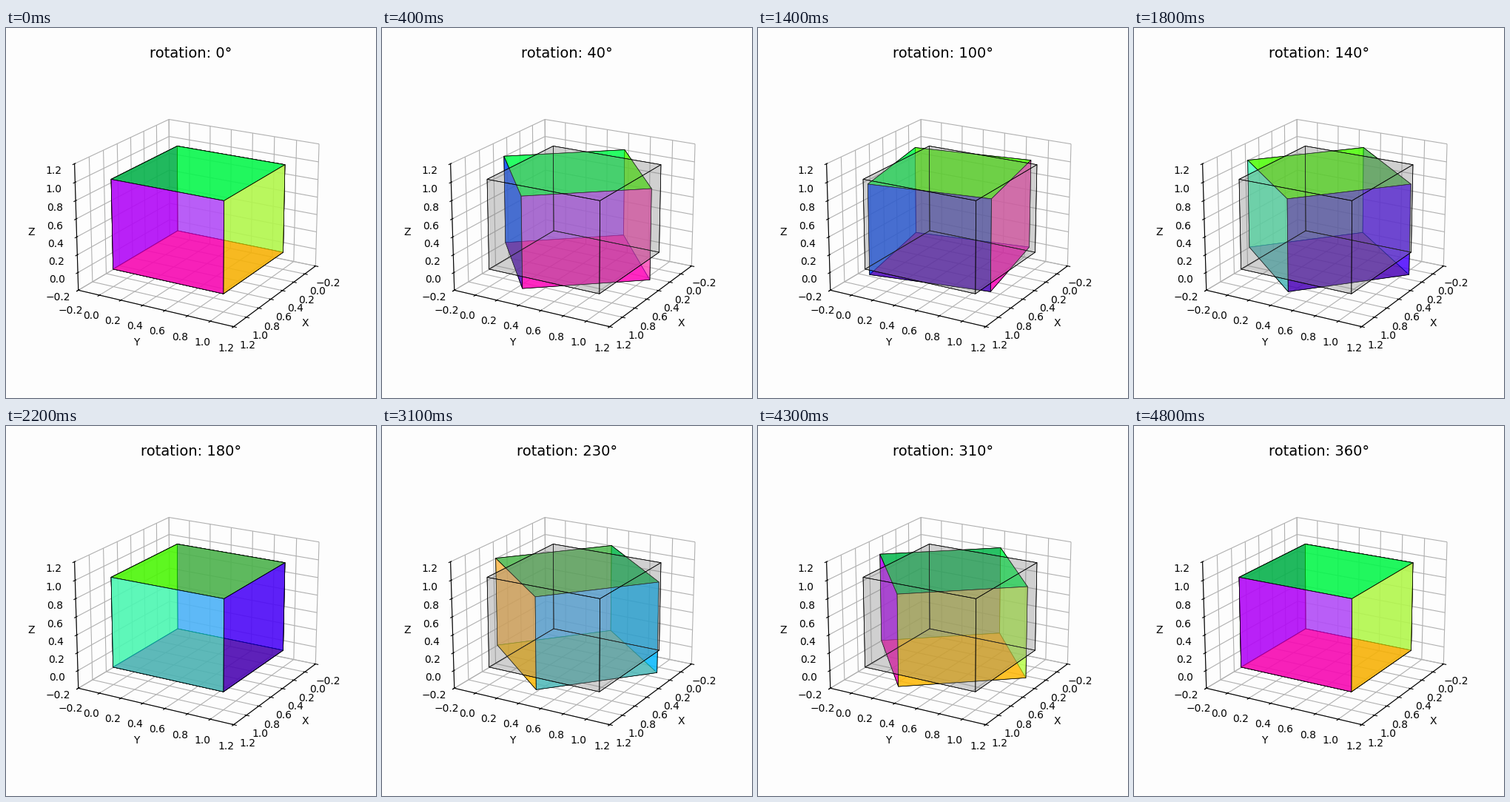
Write a matplotlib script that moves like this. It is 500 px wide and 500 px high and loops after 5.3 s.

```python
import numpy as np
import matplotlib.pyplot as plt
from matplotlib.animation import FuncAnimation
from mpl_toolkits.mplot3d.art3d import Poly3DCollection

STEP = 10            # degrees per frame while turning
TURN_FRAMES = 9      # frames for a quarter turn
HOLD_FRAMES = 4      # extra frames at rest after it
QUARTER = TURN_FRAMES + HOLD_FRAMES
FRAMES = 1 + 4 * QUARTER
BACKGROUND = "#fdfdfd"

CORNERS = np.array([(x, y, z) for z in (0, 1)
                    for x, y in ((0, 0), (1, 0), (1, 1), (0, 1))], float)
# bottom, top, y=0, x=1, y=1, x=0
FACES = [(0, 1, 2, 3), (4, 5, 6, 7), (0, 1, 5, 4),
         (1, 2, 6, 5), (2, 3, 7, 6), (3, 0, 4, 7)]
COLORS = [(1, 0, 0), (0, 1, 0), (0, 0, 1), (1, 0, 1), (1, 1, 0), (0, 1, 1)]


def cube_faces(degrees=0):
    """Faces of the unit cube turned about its vertical centre line."""
    c, s = np.cos(np.radians(degrees)), np.sin(np.radians(degrees))
    turn = np.array([[c, -s, 0], [s, c, 0], [0, 0, 1]])
    points = (CORNERS - 0.5) @ turn.T + 0.5
    return [points[list(face)] for face in FACES]


def add_cube(ax, colors, alpha, zorder):
    cube = Poly3DCollection(cube_faces(), facecolors=[(*c, alpha) for c in colors],
                            edgecolors="black", linewidths=0.5, zorder=zorder)
    ax.add_collection3d(cube)
    return cube


def angle_at(frame):
    if frame == 0:
        return 0
    quarter, step = divmod(frame - 1, QUARTER)
    return 90 * quarter + STEP * min(step + 1, TURN_FRAMES)


fig = plt.figure(figsize=(5, 5), dpi=100, facecolor=BACKGROUND)
fig.subplots_adjust(top=0.85)
ax = fig.add_subplot(projection="3d", computed_zorder=False, facecolor="none")
ax.view_init(elev=20, azim=30)
ax.set(xlim=(-0.2, 1.2), ylim=(-0.2, 1.2), zlim=(-0.2, 1.2),
       xlabel="X", ylabel="Y", zlabel="Z")
for axis in (ax.xaxis, ax.yaxis, ax.zaxis):
    axis.set_pane_color((1, 1, 1, 0))

title = fig.suptitle("", y=0.95, fontsize=14)
fixed_cube = add_cube(ax, [(0.5, 0.5, 0.5)] * 6, 0.2, zorder=2)
turning_cube = add_cube(ax, COLORS, 0.6, zorder=3)


def update(frame):
    angle = angle_at(frame)
    turning_cube.set_verts(cube_faces(angle))
    # the cube whose nearest corner is closer to the viewer goes on top
    behind = 0 < angle % 90 <= 60
    turning_cube.set_zorder(1 if behind else 3)
    title.set_text(f"rotation: {angle}°")
    return turning_cube, title


animation = FuncAnimation(fig, update, frames=FRAMES, interval=100,
                          repeat=True, repeat_delay=0, blit=False)
plt.show()
```
